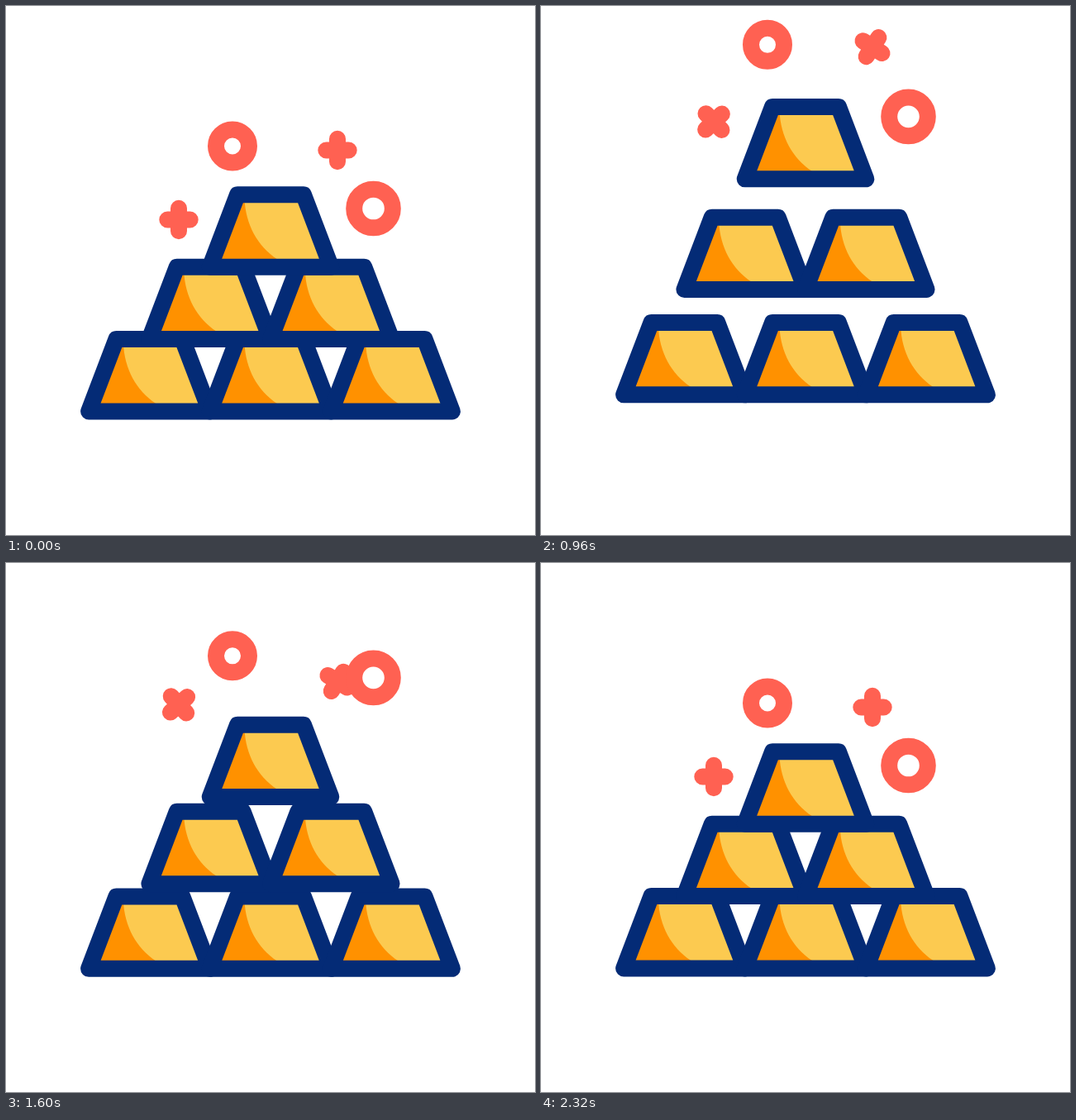
Animation, 640 px wide and 640 px high, one loop 2440 ms. Source, as an HTML page with a canvas:

```html
<!DOCTYPE html>
<html lang="en">
<head>
<meta charset="utf-8">
<title>Gold bars</title>
<style>
  html, body { margin: 0; width: 100%; height: 100%; overflow: hidden; background: #fff; }
  canvas { display: block; width: 100vmin; height: 100vmin; margin: 0 auto; }
</style>
</head>
<body>
<canvas id="stage" width="640" height="640"></canvas>
<script>
const ctx = document.getElementById('stage').getContext('2d');
const LOOP = 2440, STEP = 40;
const NAVY = '#042b76', GOLD = '#fcca50', SHADE = '#ff9100', CORAL = '#ff6152';
const LINE = 20, PITCH_X = 146.6, PITCH_Y = 87.4;

// Cubic Bezier easing with flat ends: handles at (p1, 0) and (p2, 1)
function ease(t, from, to, p1 = 1 / 3, p2 = 2 / 3) {
  const x = (t - from) / (to - from);
  if (x <= 0) return 0;
  if (x >= 1) return 1;
  let lo = 0, hi = 1, u = 0.5;
  for (let i = 0; i < 24; i++) {
    u = (lo + hi) / 2;
    const v = 1 - u;
    if (3 * u * v * v * p1 + 3 * u * u * v * p2 + u * u * u < x) lo = u;
    else hi = u;
  }
  return u * u * (3 - 2 * u);
}

// Rows crouch together, spread apart, land and settle
function rowShift(t, spread) {
  const crouch = ease(t, 205, 590) - ease(t, 1680, 1950);
  const leap = ease(t, 590, 1290, 0.3, 0.136) - ease(t, 1290, 1680, 0.85, 0.75);
  return 13 * crouch - spread * leap;
}

// Sparkles share one jump, each with its own delay
function jump(t, delay) {
  const s = t - delay;
  return -125.5 * (ease(s, 280, 1120, 0.484, 0.194) - ease(s, 1120, 2080, 0.655, 0.306));
}

function barPath() {
  ctx.beginPath();
  ctx.moveTo(-40, 0);
  ctx.lineTo(40, 0);
  ctx.lineTo(73.3, PITCH_Y);
  ctx.lineTo(-73.3, PITCH_Y);
  ctx.closePath();
}

function bar(x, y) {
  ctx.save();
  ctx.translate(x, y);
  barPath();
  ctx.fillStyle = GOLD;
  ctx.fill();

  ctx.beginPath();
  ctx.moveTo(-40, 5);
  ctx.lineTo(-31.5, 5);
  ctx.bezierCurveTo(-30, 36, -16, 62, 8, 78);
  ctx.lineTo(8, 84);
  ctx.lineTo(-70, 84);
  ctx.closePath();
  ctx.fillStyle = SHADE;
  ctx.fill();

  barPath();
  ctx.strokeStyle = NAVY;
  ctx.stroke();
  ctx.restore();
}

function row(count, y) {
  for (let i = 0; i < count; i++) bar(320 + (i - (count - 1) / 2) * PITCH_X, y);
}

function ring(x, y, r) {
  ctx.beginPath();
  ctx.arc(x, y, r, 0, Math.PI * 2);
  ctx.stroke();
}

function plus(x, y, turn) {
  const arm = 13.7;
  ctx.save();
  ctx.translate(x, y);
  ctx.rotate(turn * Math.PI);
  ctx.beginPath();
  ctx.moveTo(-arm, 0);
  ctx.lineTo(arm, 0);
  ctx.moveTo(0, -arm);
  ctx.lineTo(0, arm);
  ctx.stroke();
  ctx.restore();
}

function draw(t) {
  ctx.fillStyle = '#fff';
  ctx.fillRect(0, 0, 640, 640);
  ctx.lineWidth = LINE;
  ctx.lineJoin = ctx.lineCap = 'round';

  [39, 86, 140.5].forEach((spread, i) => {
    row(3 - i, 403.1 - i * PITCH_Y + rowShift(t, spread));
  });

  ctx.strokeStyle = CORAL;
  plus(401, 174.5 + jump(t, -80), ease(t, 460, 2296));
  ring(274, 169.5 + jump(t, 0), 20);
  plus(209, 258.5 + jump(t, 80), ease(t, 360, 2172));
  ring(444.5, 245 + jump(t, 160), 23.3);
}

const start = performance.now();
function tick() {
  const t = (performance.now() - start) % LOOP;
  draw(Math.floor(t / STEP) * STEP);
  requestAnimationFrame(tick);
}
tick();
</script>
</body>
</html>
```
